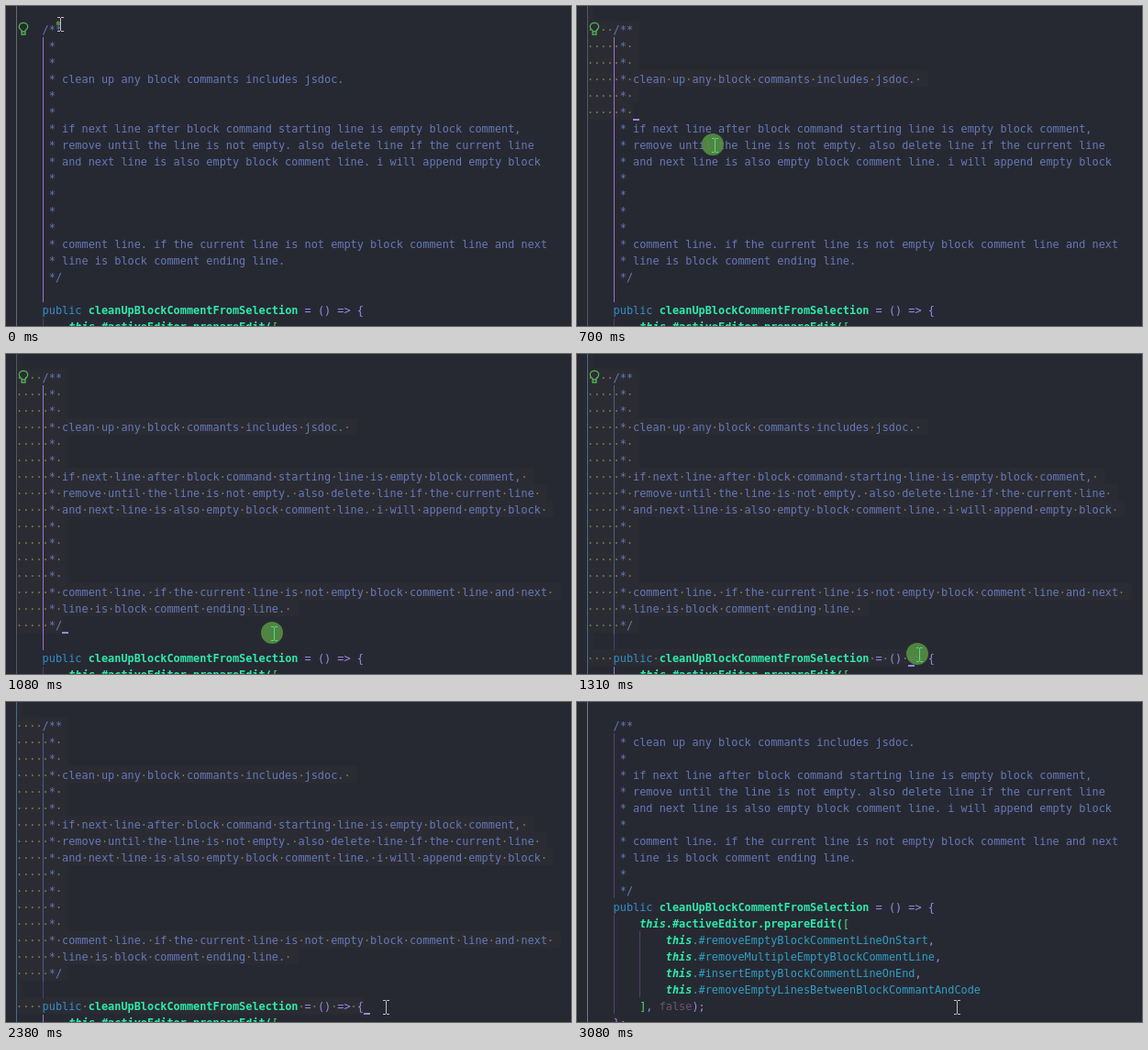
Animation of 616 by 349 pixels, one loop 3.46 s. Source, as an HTML page:

```html
<!DOCTYPE html>
<html lang="en">
<head>
<meta charset="utf-8">
<title>Block comment clean up</title>
<style>
html, body { margin: 0; width: 100%; height: 100%; overflow: hidden; background: #272932; }
#stage { position: relative; width: 616px; height: 349px; overflow: hidden; background: #272932;
  font: 11.88px/18px "DejaVu Sans Mono", monospace; color: #6678b8; font-variant-ligatures: none; }
#stage div, svg { position: absolute; }
.row, .dots { left: 11px; height: 18px; margin-top: 1px; white-space: pre; }
.dots { color: #877a50; }
.sel { left: 11px; height: 18px; border-radius: 3px; background: #2b2c33; }
.guide { width: 1px; }
.kw { color: #338fcb; }
.fn { color: #2eeaac; font-weight: bold; }
.this { color: #2eeaac; font-weight: bold; font-style: italic; }
.op { color: #9c88e8; }
.call { color: #2f9fc4; }
.br { color: #4fe06c; }
.dim { color: #6a5570; }
#caret { width: 7px; height: 2px; background: #a184e0; }
#disc { width: 24px; height: 24px; border-radius: 50%; background: rgba(84, 142, 68, .9); }
</style>
</head>
<body>
<div id="stage">
  <div id="before"></div>
  <div id="after"></div>
  <svg id="bulb" style="left:12px;top:17px" width="14" height="16" fill="none" stroke="#4fb553" stroke-width="1.3">
    <path d="M5 11V9.8C3.5 8.8 2.3 7.5 2.3 5.7a4.7 4.4 0 0 1 9.4 0C11.7 7.5 10.5 8.8 9 9.8V14H5V11H9"/>
  </svg>
  <div id="caret"></div>
  <div id="disc"></div>
  <svg id="beam" width="9" height="16" fill="none">
    <path d="M1 .5H4M5 .5H8M4.5 1V15M1 15.5H4M5 15.5H8"/>
  </svg>
</div>
<script>
const LOOP = 3460, CHAR = 7.152, LEFT = 11, TOP = 16, LINE = 18;
const $ = id => document.getElementById(id);
const span = (cls, text) => `<span class="${cls}">${text}</span>`;
const indent = n => ' '.repeat(n);
const rowTop = i => TOP + i * LINE;
const colX = c => LEFT + c * CHAR;

function add(parent, cls, style, html = '') {
  const el = document.createElement('div');
  el.className = cls;
  Object.assign(el.style, style);
  el.innerHTML = html;
  parent.append(el);
  return el;
}
const guide = (parent, x, y, height, color) =>
  add(parent, 'guide', { left: x + 'px', top: y + 'px', height: height + 'px', background: color });
const addRows = (parent, rows) =>
  rows.forEach((html, i) => add(parent, 'row', { top: rowTop(i) + 'px' }, html));

const star = (text = '') => `     * ${text}${text && ' '}`;
const intro = star('clean up any block commants includes jsdoc.');
const middle = [
  'if next line after block command starting line is empty block comment,',
  'remove until the line is not empty. also delete line if the current line',
  'and next line is also empty block comment line. i will append empty block'
].map(star);
const ending = [
  'comment line. if the current line is not empty block comment line and next',
  'line is block comment ending line.'
].map(star);
const open = '    /**', close = '     */', gap = star();
const signature = '    public cleanUpBlockCommentFromSelection = () => {';

const method = indent(4) + span('kw', 'public') + ' ' +
  span('fn', 'cleanUpBlockCommentFromSelection') + span('op', ' = () =&gt; {');
const prepare = indent(8) + span('this', 'this') +
  span('fn', '.#activeEditor.prepareEdit(') + span('br', '[');
const step = (name, comma = ',') =>
  indent(12) + span('this', 'this') + span('call', '.#' + name) + span('op', comma);

const lines = [open, gap, gap, intro, gap, gap, ...middle, gap, gap, gap, gap, ...ending, close, '', signature];
const before = $('before'), after = $('after');

const firstSel = add(before, 'sel', { top: rowTop(-1) + 'px' });
const marks = lines.map((text, i) => {
  const style = { top: rowTop(i) + 'px' };
  return { text, sel: add(before, 'sel', style), dots: add(before, 'dots', style) };
});
const margin = guide(before, 11, 0, 349, '#555862');
const commentGuide = guide(before, 40, 34, 272, '#9a74d0');
const tailGuide = guide(before, 40, 306, 17, '#9a74d0');
const bodyGuide = guide(before, 40, 341, 8, '#4f3d6c');
addRows(before, [...lines.slice(0, -1), method, prepare]);

guide(after, 11, 0, 349, '#777884');
guide(after, 40, 34, 180, '#553f70');
guide(after, 40, 232, 108, '#553f70');
guide(after, 68, 250, 72, '#553f70');
addRows(after, [
  open, intro, gap, ...middle, gap, ...ending, gap, close, method, prepare,
  step('removeEmptyBlockCommentLineOnStart'),
  step('removeMultipleEmptyBlockCommentLine'),
  step('insertEmptyBlockCommentLineOnEnd'),
  step('removeEmptyLinesBetweenBlockCommantAndCode', ''),
  indent(8) + span('br', ']') + span('op', ', ') + span('dim', 'false') + span('op', ');'),
  indent(4) + span('op', '};')
]);

// Pointer path: time, x, y
const path = [
  [0, 57, 19], [150, 57, 15], [230, 57, 12], [310, 57, 12], [390, 58, 20], [470, 66, 44],
  [540, 84, 72], [620, 105, 91], [700, 148, 151], [770, 172, 194], [850, 204, 243],
  [930, 228, 264], [990, 255, 286], [1080, 290, 304], [1160, 320, 313], [1240, 352, 324],
  [1310, 371, 327], [1390, 393, 329], [1470, 407, 329], [1540, 413, 328], [1620, 414, 328],
  [1770, 414, 329], [1850, 413, 331], [1930, 412, 332]
];

// The selection trails the pointer by part of a step.
function selectionEnd(i) {
  const [, x0, y0] = path[Math.max(0, i - 1)], [, x1, y1] = path[i];
  const x = x0 + (x1 - x0) * .4, y = y0 + (y1 - y0) * .4;
  const line = Math.max(-1, Math.min(17, Math.floor((y - TOP) / LINE)));
  const length = line < 0 ? 0 : lines[line].length;
  return { line, col: Math.min(length, Math.round((x - LEFT) / CHAR)) };
}

function select(end, active) {
  firstSel.style.width = (active && end.line >= 0 ? CHAR : 0) + 'px';
  marks.forEach(({ text, sel, dots }, i) => {
    const count = !active || i > end.line ? 0 : i < end.line ? text.length : end.col;
    const newline = active && i < end.line ? 1 : 0;
    sel.style.width = (count + newline) * CHAR + 'px';
    dots.textContent = text.slice(0, count).replace(/./g, c => c === ' ' ? '·' : ' ');
  });
}

function place(el, x, y) {
  el.style.left = x + 'px';
  el.style.top = y + 'px';
}

function draw(t) {
  const i = path.findLastIndex(p => t >= p[0]);
  const [, x, y] = path[i];
  const done = t >= 2530, dragging = t >= 230;
  const end = done ? { line: -1, col: 0 } : selectionEnd(i);
  const left = end.line === 17;

  before.style.display = done ? 'none' : '';
  after.style.display = done ? '' : 'none';
  if (!done) select(end, dragging);
  margin.style.background = left ? '#4a6a8c' : dragging ? '#555862' : '#666974';
  commentGuide.style.background = left ? '#4a6086' : '#9a74d0';
  tailGuide.style.background = left ? '#4f3d6c' : '#9a74d0';
  bodyGuide.style.background = left ? '#9a74d0' : '#4f3d6c';
  $('bulb').style.display = t < 1540 ? '' : 'none';

  const blinkOff = t < 230 || (t >= 1850 && t < 2380) || t >= 3080;
  $('caret').style.display = blinkOff ? 'none' : '';
  place($('caret'), Math.round(colX(end.col)), rowTop(end.line) + 17);

  const size = t < 150 ? .2 : t < 230 ? .7 : 1;
  const fade = t < 1770 ? 1 : t < 1850 ? .6 : t < 1930 ? .25 : 0;
  $('disc').style.transform = `scale(${size})`;
  $('disc').style.opacity = fade;
  place($('disc'), x - 12, y - 12);
  place($('beam'), x - 2, y - 7);
  $('beam').style.stroke = dragging && fade > .5 ? '#4fdc7c' : '#c4bcd0';
}

const start = performance.now();
function tick() {
  draw((performance.now() - start) % LOOP);
  requestAnimationFrame(tick);
}
tick();
</script>
</body>
</html>
```
